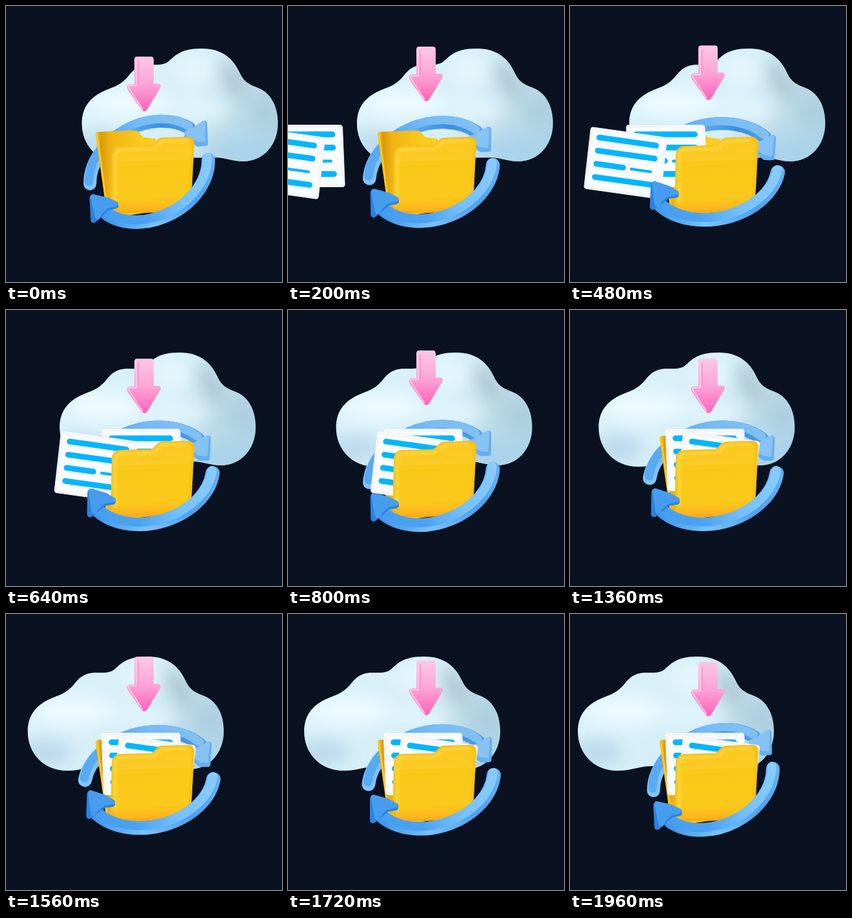
Recreate the animation shown at these times as an HTML page. Size 428 px wide and 428 px high, loop 2000 ms.

```html
<!DOCTYPE html>
<html lang="en">
<head>
<meta charset="utf-8">
<title>Cloud folder sync</title>
<style>
html, body { margin: 0; width: 100%; height: 100%; overflow: hidden; background: #0a1120; }
svg { display: block; width: 100vw; height: 100vh; }
</style>
</head>
<body>
<svg viewBox="0 0 428 428">
  <defs>
    <linearGradient id="cloudFill" gradientUnits="userSpaceOnUse" x1="150" y1="90" x2="410" y2="225">
      <stop offset="0" stop-color="#dcf2fa"/><stop offset=".5" stop-color="#d6eef8"/>
      <stop offset=".75" stop-color="#bddbe9"/><stop offset="1" stop-color="#abd3e7"/>
    </linearGradient>
    <linearGradient id="pinkFill" gradientUnits="userSpaceOnUse" x1="0" y1="78" x2="0" y2="163">
      <stop offset="0" stop-color="#fbc8e7"/><stop offset=".5" stop-color="#fda5d8"/><stop offset="1" stop-color="#fd62b8"/>
    </linearGradient>
    <linearGradient id="backFill" gradientUnits="userSpaceOnUse" x1="140" y1="0" x2="212" y2="0">
      <stop offset="0" stop-color="#f7c21c"/><stop offset=".1" stop-color="#d99b0b"/>
      <stop offset=".3" stop-color="#efb414"/><stop offset="1" stop-color="#fccb20"/>
    </linearGradient>
    <linearGradient id="frontFill" gradientUnits="userSpaceOnUse" x1="222" y1="203" x2="226" y2="325">
      <stop offset="0" stop-color="#fcc71c"/><stop offset=".3" stop-color="#fbcb26"/><stop offset=".31" stop-color="#f9c817"/>
      <stop offset=".78" stop-color="#fac91c"/><stop offset=".92" stop-color="#fbb51f"/><stop offset="1" stop-color="#f59422"/>
    </linearGradient>
    <linearGradient id="rimFill" gradientUnits="userSpaceOnUse" x1="130" y1="330" x2="324" y2="240">
      <stop offset="0" stop-color="#2f86e2"/><stop offset=".4" stop-color="#78c3fb"/>
      <stop offset=".75" stop-color="#4f9fec"/><stop offset="1" stop-color="#64b0f4"/>
    </linearGradient>
    <linearGradient id="faceFill" gradientUnits="userSpaceOnUse" x1="130" y1="310" x2="320" y2="230">
      <stop offset="0" stop-color="#459df0"/><stop offset=".35" stop-color="#4ba2f1"/>
      <stop offset=".65" stop-color="#75c1fb"/><stop offset="1" stop-color="#8accfb"/>
    </linearGradient>
    <linearGradient id="topFill" gradientUnits="userSpaceOnUse" x1="125" y1="280" x2="310" y2="190">
      <stop offset="0" stop-color="#58aaf3"/><stop offset=".3" stop-color="#58a9f1"/>
      <stop offset=".6" stop-color="#78bcf4"/><stop offset="1" stop-color="#84c1f2"/>
    </linearGradient>
    <linearGradient id="innerFill" gradientUnits="userSpaceOnUse" x1="125" y1="280" x2="310" y2="190">
      <stop offset="0" stop-color="#82c4fa"/><stop offset=".3" stop-color="#7bbdf4"/>
      <stop offset=".7" stop-color="#3c8fe3"/><stop offset="1" stop-color="#5ba7ea"/>
    </linearGradient>
    <filter id="blur" x="-60%" y="-60%" width="220%" height="220%"><feGaussianBlur stdDeviation="13"/></filter>
    <filter id="soft" x="-20%" y="-20%" width="140%" height="140%"><feGaussianBlur stdDeviation="2"/></filter>
    <path id="cloudShape" d="M117 182C117 155 132 139 158 129C172 124 180 119 188 110C196 100 204 91 222 91C232 91 242 92 250 87C260 80 266 66 303 66C335 66 352 82 362 104C368 117 375 121 388 126C410 134 421 155 421 182C421 216 398 241 367 241C350 241 340 235 325 235L230 236C213 236 200 243 178 243C142 243 117 216 117 182Z"/>
    <path id="frontShape" d="M164 232Q164 218 178 217L222 216C232 216 231 205 243 204L282 203Q292 203 292 214L288 287Q286 312 262 320L176 321Q162 321 162.500 306Z"/>
    <clipPath id="cloudClip"><use href="#cloudShape"/></clipPath>
    <clipPath id="frontClip"><use href="#frontShape"/></clipPath>
    <g id="page">
      <rect width="122" height="96" rx="4" fill="#fbfcfe" stroke="#e3e9ef" stroke-width=".8"/>
      <rect x="3" y="3" width="116" height="90" rx="3" fill="none" stroke="#e6edf3"/>
      <g fill="none" stroke="#03b6fe" stroke-width="8.800" stroke-linecap="round">
        <path d="M15 14.500H106M15 35H106M15 55.500H58M15 76H106"/>
        <path d="M71 56H102" stroke-width="4.400"/>
      </g>
    </g>
  </defs>

  <rect width="428" height="428" fill="#0a1120"/>

  <g id="cloud">
    <use href="#cloudShape" fill="url(#cloudFill)"/>
    <g clip-path="url(#cloudClip)"><g filter="url(#blur)">
      <ellipse cx="190" cy="150" rx="64" ry="20" fill="#edfcfe"/>
      <ellipse cx="290" cy="100" rx="28" ry="26" fill="#e4f6fb"/>
      <ellipse cx="300" cy="160" rx="45" ry="18" fill="#e2f5fb"/>
      <ellipse cx="352" cy="115" rx="11" ry="34" fill="#a6c0cd" transform="rotate(-30 352 115)"/>
      <ellipse cx="400" cy="165" rx="20" ry="26" fill="#adcddd"/>
      <ellipse cx="145" cy="215" rx="42" ry="22" fill="#bbdaed"/>
      <ellipse cx="355" cy="225" rx="50" ry="14" fill="#a5d1ea"/>
    </g></g>
  </g>

  <g class="ring" stroke-linecap="round">
    <path class="backArc" fill="none" stroke="url(#innerFill)" stroke-width="20"/>
    <path class="backArc" fill="none" stroke="url(#topFill)" stroke-width="13" transform="translate(-1.500 -3.500)"/>
  </g>
  <g id="backHead" stroke-linejoin="round">
    <path d="M308 182L309 213L298 214L280 203L290 195Z" fill="#66afec" stroke="#66afec" stroke-width="8"/>
    <path d="M306 181L306 208L296 207L279 197L290 192Z" fill="#86c2f3" stroke="#86c2f3" stroke-width="6"/>
  </g>

  <path d="M139 200Q138 195 146 195L198 193Q206 193 209 199Q212 204 218 204L232 206L250 316L166 328Q158 330 156 320Z" fill="url(#backFill)"/>
  <path d="M141 198L158 322" stroke="#fbc823" stroke-width="3"/>

  <g id="backPage"><use href="#page" transform="skewX(2.300)"/></g>
  <g id="frontPage"><use href="#page" transform="rotate(8) skewX(1.500) scale(.98 1)"/></g>

  <use href="#frontShape" fill="url(#frontFill)"/>
  <g clip-path="url(#frontClip)">
    <use href="#frontShape" fill="none" stroke="#eeb00f" stroke-width="4" opacity=".7" filter="url(#soft)"/>
    <path d="M169 305V233Q169 223 179 222L224 221C235 220 235 210 245 209L281 208" fill="none" stroke="#ffdc55" stroke-width="3" filter="url(#soft)"/>
  </g>

  <g class="ring" stroke-linecap="round">
    <path class="frontArc" fill="none" stroke="url(#rimFill)" stroke-width="21"/>
    <path class="frontArc" fill="none" stroke="url(#faceFill)" stroke-width="14" transform="translate(-1.500 -3.500)"/>
  </g>
  <g id="frontHead" stroke-linejoin="round">
    <path d="M134 298L157 304L170 310L157 313L144 325L136 332Z" fill="#2d82df" stroke="#2d82df" stroke-width="9"/>
    <path d="M135 296L157 301L170 307L156 310L146 320L142 327Z" fill="#469df0" stroke="#469df0" stroke-width="8"/>
  </g>

  <g id="arrow" stroke-linejoin="round">
    <path d="M203 78H225Q229 78 229 83V120H236Q242 121 239 127L219 160Q215 165 211 161L189 130Q185 122 192 121H199V83Q199 78 203 78Z" fill="url(#pinkFill)"/>
    <path d="M202 83V123H192Q188 124 191 128L212 160" fill="none" stroke="#fdc6e6" stroke-width="2"/>
    <path d="M205 84V121" stroke="#f58fcb" stroke-width="1.500"/>
  </g>
</svg>
<script>
const LOOP = 2000;
const CENTER = { x: 222, y: 257 };
const TILT = 27 * Math.PI / 180;
const $ = id => document.getElementById(id);
const rings = document.querySelectorAll('.ring');

function ringPoint(degrees) {
  const a = degrees * Math.PI / 180;
  const u = 96 * Math.cos(a), v = 73 * Math.sin(a);
  const x = CENTER.x + u * Math.cos(TILT) + v * Math.sin(TILT);
  const y = CENTER.y - u * Math.sin(TILT) + v * Math.cos(TILT);
  return `${x.toFixed(2)} ${y.toFixed(2)}`;
}

function setArc(selector, from, to) {
  const d = `M${ringPoint(from)}A96 73 -27 0 1 ${ringPoint(to)}`;
  document.querySelectorAll(selector).forEach(path => path.setAttribute('d', d));
}

const transform = (node, value) => node.setAttribute('transform', value);
const move = (id, x, y) => transform($(id), `translate(${x} ${y})`);

// Triangle wave: 0 at the ends of each period, 1 in the middle.
function bounce(t, period) {
  return 1 - Math.abs(1 - 2 * (t % period) / period);
}

// The ring lies in a tilted plane, so it widens as it turns.
function turnRing(p) {
  const { x, y } = CENTER;
  const value = `translate(${x} ${y}) scale(${1 + 0.073 * p} 1) rotate(${12.4 * p}) translate(${-x} ${-y})`;
  rings.forEach(ring => transform(ring, value));
  transform($('frontHead'), `translate(${-6 * p} ${-20 * p}) rotate(${6 * p} 148 312)`);
  transform($('backHead'), `translate(${6 * p} ${22 * p}) rotate(${6 * p} 298 200)`);
}

function render(t) {
  move('cloud', 0.7 - 0.0538 * t, 0);
  move('arrow', 0, 0.5 - 19.5 * bounce(t, LOOP / 6));
  move('backPage', Math.min(148, -127 + 0.445 * t), 184.5);
  move('frontPage', Math.min(176, -127.5 + 0.3325 * t), 187.5);
  turnRing(bounce(t, LOOP / 2));
}

setArc('.frontArc', 20, 156);
setArc('.backArc', 200, 334);

const start = performance.now();
function tick() {
  render((performance.now() - start) % LOOP);
  requestAnimationFrame(tick);
}
tick();
</script>
</body>
</html>
```
